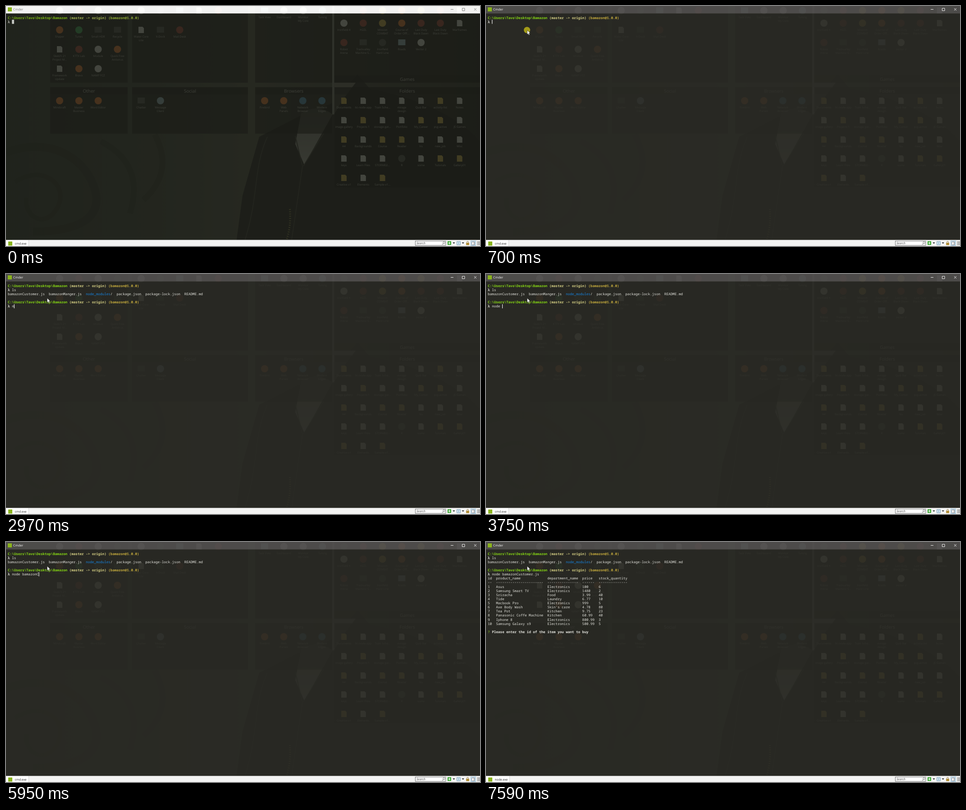
An HTML page that plays this animation: 1052 by 532 pixels, repeating every 8 s.

```html
<!DOCTYPE html>
<html lang="en">
<head>
<meta charset="utf-8">
<title>Terminal session</title>
<style>
  html, body { margin: 0; width: 100%; height: 100%; overflow: hidden; background: #1b1c18; }
  svg { display: block; }
  text { white-space: pre; text-rendering: geometricPrecision; }
  .ui { font-family: "Open Sans", "Noto Sans", sans-serif; }
  .mono { font: 500 7.605px "Noto Sans Mono", "DejaVu Sans Mono", monospace; fill: #e4e4de; }
  .bold { font-weight: 700; }
  .path { fill: #86d714; }
  .branch { fill: #d6d084; }
  .package { fill: #c5ab3d; }
  .dir { fill: #1684e0; }
  .mark { fill: #6c9a1c; }
  .idle .path { fill: #7cb814; }
  .idle .branch { fill: #a5b653; }
  .idle .package { fill: #8fab35; }
  .idle .mono { fill: #c4c4bc; }
  #shade { fill: #2a2b25; fill-opacity: .93; }
  .idle #shade { fill: #23251e; fill-opacity: .75; }
  #bar { fill: #514f4d; fill-opacity: .95; }
  .idle #bar { fill: #fff; fill-opacity: .94; }
  #frame { fill: #fff; stroke: #fff; }
  .idle #frame { fill: #777; stroke: #777; }
</style>
</head>
<body>
<svg id="stage" xmlns="http://www.w3.org/2000/svg" width="1052" height="532" viewBox="0 0 1052 532">
  <defs>
    <linearGradient id="wall">
      <stop offset="0" stop-color="#182019"/>
      <stop offset=".3" stop-color="#222820"/>
      <stop offset=".52" stop-color="#303329"/>
      <stop offset="1" stop-color="#171914"/>
    </linearGradient>
    <linearGradient id="shirt" x2="0" y2="1">
      <stop offset="0" stop-color="#4a4c47"/>
      <stop offset="1" stop-color="#74776f"/>
    </linearGradient>
  </defs>

  <g id="desktop">
    <rect width="1052" height="532" fill="url(#wall)"/>
    <g fill="none" stroke="#10150f" stroke-opacity=".45">
      <path d="M0 325C90 290 170 330 195 400S160 500 60 500" stroke-width="18"/>
      <path d="M210 300C270 330 300 380 275 460M330 285C360 340 350 390 305 430" stroke-width="13"/>
      <path d="M20 390C80 350 140 395 115 445S40 470 45 425" stroke-width="10"/>
    </g>
    <path d="M780 152L808 184C900 200 1000 240 1052 300V532H510L525 420 562 290 650 245 725 215Z" fill="#0b0c0a"/>
    <path d="M655 238Q690 215 725 240L700 285 662 352 642 306Z" fill="url(#shirt)"/>
    <path d="M642 288L658 355 632 532M705 282L660 355M580 290C548 360 562 420 530 520" fill="none" stroke="#22241f" stroke-width="2"/>
    <path d="M630 450Q633 490 622 520" fill="none" stroke="#55552b" stroke-width="4" stroke-dasharray="2 3"/>
    <path d="M724 170H776L748 207 727 242Z" fill="#474941"/>
    <path d="M726 0V240" stroke="#55584f" stroke-width="4"/>
    <g id="panels"></g>
    <g id="icons" class="ui" font-size="6.2" text-anchor="middle" fill="#8b8d86"></g>
  </g>

  <rect id="shade" y="16" width="1052" height="503"/>
  <rect id="bar" width="1052" height="16.5"/>
  <rect x="4" y="3" width="9" height="9" fill="#8ab31d"/>
  <g id="frame">
    <text class="ui" x="16" y="10.2" font-size="7" stroke="none">Cmder</text>
    <path d="M987 7.5H993M1012.5 5H1018V10.5H1012.5ZM1039 5L1044 10M1044 5L1039 10" fill="none" stroke-width=".9"/>
  </g>

  <g id="terminal"></g>
  <rect id="caret"/>

  <g id="status" class="ui" font-size="6.7">
    <rect y="518.5" width="1052" height="14" fill="#f4f4f3"/>
    <rect id="tab" x="0" y="519" height="13" fill="#fff"/>
    <path id="tabEdge" stroke="#c9c9c9" stroke-width=".8"/>
    <rect x="5" y="522" width="9" height="9" fill="#8ab31d"/>
    <text id="process" x="19.5" y="529" fill="#222"></text>
    <rect x="908.5" y="521" width="67.5" height="9.5" fill="#fff" stroke="#555" stroke-width=".8"/>
    <text x="911" y="528.2" font-style="italic" fill="#444">Search</text>
    <path d="M968 529L970.5 526.5" stroke="#555"/>
    <circle cx="972" cy="524.7" r="2.2" fill="none" stroke="#555" stroke-width=".8"/>
    <rect x="980" y="521.5" width="8" height="8" fill="#34a32b"/>
    <path d="M984 523V528M981.5 525.5H986.5" stroke="#fff" stroke-width="1.4"/>
    <path d="M991.5 524H996.5L994 527ZM1011.8 524H1016.8L1014.3 527Z" fill="#222"/>
    <rect x="1000.8" y="522" width="7.5" height="7.5" fill="#d5e7f2" stroke="#5f8dab" stroke-width=".8"/>
    <path d="M1004.5 523.5V528" stroke="#5f8dab" stroke-width=".8"/>
    <rect x="1021.3" y="525" width="6.6" height="5" fill="#b08c32"/>
    <path d="M1022.8 525V523.5A1.8 1.8 0 0 1 1026.4 523.5V525" fill="none" stroke="#8b7136"/>
    <rect x="1031.8" y="520.5" width="10.5" height="11" fill="#cfe4f3" stroke="#86b4d3" stroke-width=".7"/>
    <path d="M1034 522.8H1040V529.5H1034ZM1038.5 522.8V529.5" fill="#fff" stroke="#666" stroke-width=".7"/>
    <path d="M1045.5 523H1052M1045.5 526H1052M1045.5 529H1052" stroke="#444" stroke-width="1.1"/>
  </g>

  <circle id="click" cx="91" cy="53.3" r="7" fill="#a39b18"/>
  <path id="pointer" d="M0 0V9.7L2.2 7.7 3.8 11 5.5 10.2 3.9 7H7Z" fill="#fff" stroke="#1b1b18" stroke-width=".6"/>
</svg>

<script>
const LOOP = 8000, COL = 4.563, ROW = 9.13, LEFT = 4;
const $ = id => document.getElementById(id);

function add(parent, tag, attrs, content = '') {
  const el = document.createElementNS('http://www.w3.org/2000/svg', tag);
  for (const key in attrs) el.setAttribute(key, attrs[key]);
  el.textContent = content;
  return parent.appendChild(el);
}

// Desktop behind the window
function panel(x, y, w, h, title, titleY) {
  add($('panels'), 'rect', { x, y, width: w, height: h, fill: '#000', 'fill-opacity': .62 });
  if (!title) return;
  add($('panels'), 'rect', { x, y: titleY - 8, width: w, height: 16, fill: '#000', 'fill-opacity': .45 });
  add($('panels'), 'text', { class: 'ui', x: x + w / 2, y: titleY + 3.5, fill: '#8d8f88',
    'font-size': 10, 'text-anchor': 'middle' }, title);
}
panel(98, 0, 172, 170);
panel(280, 0, 257, 170);
panel(553, 0, 171, 170);
panel(729, 0, 323, 170, 'Games', 162);
panel(98, 180, 172, 103, 'Other', 188);
panel(280, 180, 257, 103, 'Social', 188);
panel(553, 180, 171, 103, 'Browsers', 188);
panel(729, 180, 323, 222, 'Folders', 188);

const hues = { o: '#b0561c', g: '#25803d', w: '#a5a79f', k: '#30322e', r: '#762b20',
  y: '#9c8430', b: '#326b8b', c: '#6c8790' };

function icon(x, y, code, label) {
  const fill = hues[code.toLowerCase()];
  if (code === 'W' || code === 'Y')
    add($('icons'), 'path', { d: `M${x - 6} ${y - 7}h9l3 3v11h-12z`, fill });
  else if (code === code.toUpperCase())
    add($('icons'), 'rect', { x: x - 8, y: y - 7, width: 16, height: 13, fill });
  else add($('icons'), 'circle', { cx: x, cy: y, r: 8, fill });
  label.split('|').forEach((line, i) =>
    add($('icons'), 'text', { x, y: y + 17 + i * 8 }, line));
}
function icons(x, y, codes, labels, step = 42.8) {
  const names = labels.split(',');
  [...codes].forEach((code, i) => icon(x + i * step, y, code, names[i] || ''));
}
icons(119, 10, 'wrwk', '');
icons(300, 10, 'wkCWr', '');
icons(574, 10, 'Cwwc', 'Task View,Dashboard,Monitor|My Core,Tuning');
icons(750, 10, 'kryoyrW', '');
icons(119, 53, 'ogKK', 'Shaper,Tunes,Small HDR,Recycle');
icons(119, 96, 'Wrwo', 'Sketch 21|Project M...,KTTX Lab,Module,Quick Free|Antivirus');
icons(119, 139, 'Wow', 'Framework|Update,Bravo,NAMP FCZ');
icons(300, 53, 'WKr', 'Water Core|Lite,X-Dock,Mail Desk');
icons(750, 38, 'wryorrW', 'Ironfield 4,H2ZL,Mission|COMBAT,Course of|Order Offl...,Last Duty|Black Dawn,Last Duty|Black Dawn,Warframes');
icons(750, 81, 'rKkCw', 'Robot|Arena,Trackvalley|Machine S...,Ironfield|Hard Line,Roads,Vector 2');
icons(119, 210, 'ooo', 'Mindcraft,Master|Business,Word Editor');
icons(300, 210, 'Kc', 'Chatter,Message|Client');
icons(574, 210, 'oobb', 'Firebird,Web|Panels,Network|Browser,Modern|Edges', 42.4);
icons(750, 210, 'YWWWWYW', 'Documents,tic-node-app,Train Sche...,mirage|design,Quiz Bar,activity-list,Notes');
icons(750, 253, 'WYWWYYW', 'image-gallery,Projects 1,storage-gat...,Portfolio,My_Career,psg-active,JS Games');
icons(750, 296, 'YWYYWWW', 'A4,Backgrounds,Course,Reader,lrs,new_job,Misc');
icons(750, 338, 'WWWkWYY', 'keys,Learn Files,STORM02...,R,some,Tutorials,Gallery01');
icons(750, 381, 'YWY', 'Creative v1,Elements,Sample-v1...');

// Terminal contents; each line appears at its own time
const timedLines = [];
function line(row, from, ...spans) {
  const el = add($('terminal'), 'text', { class: 'mono', x: LEFT, y: 28.5 + row * ROW });
  for (const [content, style = ''] of spans) add(el, 'tspan', { class: style }, content);
  timedLines.push({ el, from });
  return el;
}
function prompt(row, from) {
  line(row, from, ['C:\\Users\\Tavo\\Desktop\\Bamazon ', 'path bold'],
    ['(master -> origin) ', 'branch bold'], ['(bamazon@1.0.0)', 'package bold']);
  return line(row + 1, from, ['λ ', 'bold'], ['']).lastChild;
}
const firstInput = prompt(0, 0);
line(2, 2030, ['bamazonCustomer.js  bamazonManger.js  '], ['node_modules', 'dir'],
  ['/  package.json  package-lock.json  README.md']);
const secondInput = prompt(4, 2190);

const dash = n => '-'.repeat(n);
const products = [
  'id|product_name|department_name|price|stock_quantity',
  [2, 23, 15, 6, 14].map(dash).join('|'),
  '1|Asus|Electronics|100|6',
  '2|Samsung Smart TV|Electronics|1480|2',
  '3|Sriracha|Food|3.99|40',
  '4|Tide|Laundry|6.77|10',
  '5|Macbook Pro|Electronics|999|5',
  "6|Axe Body Wash|Skin's care|4.78|80",
  '7|Tea Pot|Kitchen|9.75|23',
  '8|Panasonic Coffe Machine|Kitchen|60.99|40',
  '9|Iphone 8|Electronics|800.99|3',
  '10|Samsung Galaxy s9|Electronics|500.99|5'
];
const widths = [4, 25, 17, 8, 14];
products.forEach((record, i) =>
  line(6 + i, 7050, [record.split('|').map((cell, c) => cell.padEnd(widths[c])).join('')]));
line(19, 7050, ['? ', 'mark bold'], ['Please enter the id of the item you want to buy', 'bold']);

const command = 'node bamazonCustomer.js ';
const keyTimes = [2970, 3130, 3360, 3510, 3750, 4140, 4380, 4540, 4620, 5010, 5170, 5560, 5950];

function caretAt(t, firstCount, secondCount) {
  if (t < 1950) return [2 + firstCount, 1];
  if (t < 2030) return [0, 2];
  if (t < 2110) return [0, 3];
  if (t < 2190) return [0, 4];
  if (t < 6580) return [2 + secondCount, 5];
  return t < 7050 ? [0, 6] : [50, 19];
}
const within = (t, a, b) => t >= a && t < b;
const show = (el, on) => el.setAttribute('visibility', on ? 'visible' : 'hidden');

function render(t) {
  const idle = t < 700;
  $('stage').setAttribute('class', idle ? 'idle' : '');
  for (const { el, from } of timedLines) show(el, t >= from);

  const firstCount = (t >= 1790) + (t >= 1870);
  const secondCount = t >= 6340 ? command.length : keyTimes.filter(k => t >= k).length;
  firstInput.textContent = 'ls'.slice(0, firstCount);
  secondInput.textContent = command.slice(0, secondCount);

  const [col, row] = caretAt(t, firstCount, secondCount);
  const caret = { x: LEFT + col * COL, y: 30.4 + (row - 1) * ROW, width: idle ? 4.8 : 1.1,
    height: 9.2, fill: idle ? '#c5c8c2' : '#fff' };
  for (const key in caret) $('caret').setAttribute(key, caret[key]);
  show($('caret'), !(within(t, 1240, 1790) || within(t, 2740, 2970) || t >= 7590));

  const node = t >= 6890, tabWidth = node ? 52.5 : 50.5;
  $('process').textContent = node ? 'node.exe' : 'cmd.exe';
  $('tab').setAttribute('width', tabWidth);
  $('tabEdge').setAttribute('d', `M${tabWidth} 519V532`);

  // The pointer is sampled every 80 ms while it travels.
  const step = Math.min(7, Math.floor((t - 70) / 80));
  const rest = Math.pow(1 - Math.max(0, step) / 7, 2.4);
  $('pointer').setAttribute('transform', `translate(${91.4 + 760 * rest} ${53.6 + 460 * rest})`);
  show($('pointer'), t >= 70);
  show($('click'), within(t, 700, 780));
}

const start = performance.now();
function tick() {
  render((performance.now() - start) % LOOP);
  requestAnimationFrame(tick);
}
tick();
</script>
</body>
</html>
```
